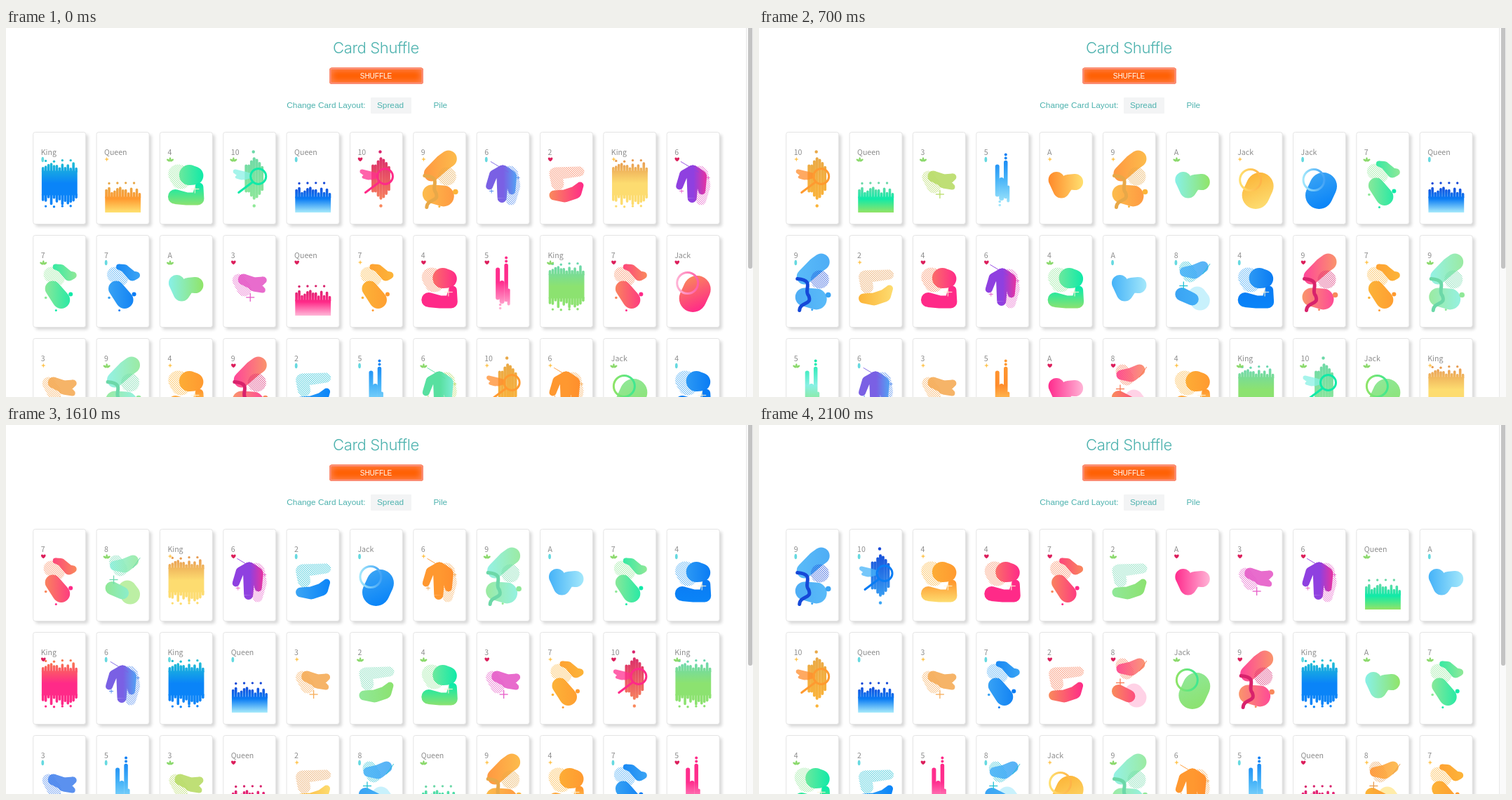
Animation, 1065 px wide and 526 px high, one loop 2170 ms. Source, as an HTML page with a canvas:

```html
<!DOCTYPE html>
<html lang="en">
<head>
<meta charset="utf-8">
<title>Card Shuffle</title>
<style>
  html, body { margin: 0; width: 100%; height: 100%; overflow: hidden; background: #fff; }
  canvas { display: block; }
</style>
</head>
<body>
<canvas id="stage" width="1065" height="526"></canvas>
<script>
const c = document.getElementById('stage').getContext('2d');
const LOOP = 2170, COLUMNS = 11;

// Suits: h heart, d drop, l leaf, s star. T is the ten.
const deals = [
  { from: 0, cards: 'Kd Qs 4l Tl Qd Th 9s 6d 2h Ks 6h 7l 7d Al 3h Qh 7s 4h 5h Kl 7h Jh 3s 9l 4s 9h 2d 5d 6l Ts 6s Jl 4d' },
  { from: 560, cards: 'Ts Ql 3l 5d As 9s Al Js Jd 7l Qd 9d 2s 4h 6h 4l Ad 8d 4d 9h 7s 9l 5l 6d 3s 5s Ah 8h 4s Kl Tl Jl Ks' },
  { from: 1330, cards: '7h 8l Ks 6h 2d Jd 6s 9l Ad 7l 4d Kh 6d Kd Qd 3s 2l 4l 3h 7s Th Kl 3d 5d 3l Qh 2s 8d Ql 9s 4s 7d 5h' },
  { from: 2100, cards: '9d Td 4s 4h 7h 2l Ah 3h 6h Ql Ad Ts Qd 3s 7d 2h 8h Jl 9h Kd Al 7l 4l 2d 5h 8d Js 9l 6s 5d Qh 8s 7s' }
];

const names = { T: '10', J: 'Jack', Q: 'Queen', K: 'King' };

const palettes = {
  h: { edge: '#f97850', base: '#ff2a88', deep: '#d8226c', main: '#ff2a88', start: '#ff2f8f', tip: '#ffb4d6', odd: '#e65cc8', warm: '#f9885c', horse: '#8f40e0' },
  d: { edge: '#20c0d4', base: '#0a84f8', deep: '#1548d8', main: '#0a7cf4', start: '#48b4f8', tip: '#a4e8fb', odd: '#4a86ee', warm: '#3aa4f4', horse: '#7a60e4' },
  l: { edge: '#6cd8b0', base: '#8ce270', deep: '#6cd8a8', main: '#10eaa8', start: '#88f0e4', tip: '#90e468', odd: '#b8dc68', warm: '#90e898', horse: '#58e0a0' },
  s: { edge: '#e89c50', base: '#fddc70', deep: '#e8a848', main: '#ff9a30', start: '#ff8c2c', tip: '#ffe070', odd: '#f6ac58', warm: '#fcb438', horse: '#ff9830' }
};

const rand = n => {
  const v = Math.sin(n * 12.9898 + 4.1) * 43758.5453;
  return v - Math.floor(v);
};

function ramp(colors, x0, y0, x1, y1) {
  const g = c.createLinearGradient(x0, y0, x1, y1);
  colors.forEach((k, i) => g.addColorStop(i / (colors.length - 1), k));
  return g;
}
const across = (...colors) => ramp(colors, 14, 0, 62, 0);
const down = (y0, y1, ...colors) => ramp(colors, 0, y0, 0, y1);

// Circles [x, y, r] joined one to the next by their outer tangents.
function chain(circles) {
  const path = new Path2D();
  circles.forEach(([x, y, r], i) => {
    path.moveTo(x + r, y);
    path.arc(x, y, r, 0, 2 * Math.PI);
    if (!i) return;
    const [px, py, pr] = circles[i - 1];
    const dir = Math.atan2(y - py, x - px);
    const ratio = (pr - r) / Math.hypot(x - px, y - py);
    const open = Math.acos(Math.max(-1, Math.min(1, ratio)));
    const a = dir - open, b = dir + open;
    path.moveTo(px + pr * Math.cos(a), py + pr * Math.sin(a));
    path.lineTo(x + r * Math.cos(a), y + r * Math.sin(a));
    path.lineTo(x + r * Math.cos(b), y + r * Math.sin(b));
    path.lineTo(px + pr * Math.cos(b), py + pr * Math.sin(b));
    path.closePath();
  });
  return path;
}

function blob(paint, ...circles) {
  c.fillStyle = paint;
  c.fill(chain(circles));
}

function faint(alpha, draw) {
  c.globalAlpha = alpha;
  draw();
  c.globalAlpha = 1;
}

function line(x0, y0, x1, y1, paint, width, cap = 'round') {
  c.beginPath();
  c.moveTo(x0, y0);
  c.lineTo(x1, y1);
  c.strokeStyle = paint;
  c.lineWidth = width;
  c.lineCap = cap;
  c.stroke();
}

function hatch(color, ...circles) {
  c.save();
  c.clip(chain(circles));
  for (let x = -70; x < 75; x += 2.9) line(x, 30, x + 80, 110, color, 0.9);
  c.restore();
}

const dot = (x, y, r, paint) => blob(paint, [x, y, r]);

function ring(x, y, r, paint) {
  c.beginPath();
  c.arc(x, y, r, 0, 2 * Math.PI);
  c.lineWidth = 3;
  c.strokeStyle = paint;
  c.stroke();
}

function plus(x, y, r, color, width = 1.3) {
  line(x - r, y, x + r, y, color, width, 'butt');
  line(x, y - r, x, y + r, color, width, 'butt');
}

// A row of thirteen drips reaching away from a solid edge, with loose drops.
function drips(edge, reach, paint, seed) {
  for (let i = 0; i < 13; i++) {
    const x = 14 + i * 3.95;
    const length = reach * (0.15 + 0.5 * rand(seed + i) + 0.25 * (i % 2));
    line(x, edge, x, edge + length, paint, 3.6);
    if (i % 3 === 1) dot(x, edge + reach * (0.95 + 0.2 * rand(seed - i)), 1.7, paint);
  }
}

const art = {
  A(p) {
    blob(across(p.start, p.tip), [24, 68, 11.5], [31, 82, 12], [40, 71, 10.5], [50.5, 71, 11.5]);
  },
  2(p) {
    hatch(p.edge, [56, 56, 7], [22, 59, 9], [25, 74, 9]);
    blob(across(p.warm, p.base), [20, 90, 7], [35, 91, 9], [50, 86, 9], [57, 76, 5]);
  },
  3(p) {
    hatch(p.odd, [22, 64, 9], [30, 77, 10]);
    faint(0.9, () => blob(p.odd, [29, 63, 8], [44, 69, 9], [57, 64, 5], [44, 71, 9], [56, 78, 4]));
    plus(38.5, 88.5, 6, p.odd);
  },
  4(p) {
    hatch(p.warm, [26, 60, 14], [30, 67, 14]);
    blob(across(p.warm, p.main), [42, 61, 14.5], [49, 62, 13]);
    blob(down(76, 104, p.main, p.base), [22, 92, 10.5], [38, 95, 9], [54, 95, 9], [56, 78, 6]);
    plus(50, 81, 6, 'rgba(255,245,215,.8)');
  },
  5(p) {
    const g = down(30, 104, p.main, p.start, p.tip);
    line(30, 49, 30, 89, g, 6);
    line(36, 68, 36, 94, g, 7);
    line(42, 43, 42, 92, g, 5.5);
    line(45.5, 78, 45.5, 98, g, 4);
    for (const y of [32, 37]) {
      dot(42, y, 2, g);
      dot(33.5, y + 67, 1.8, g);
    }
  },
  6(p) {
    const g = across(p.horse, p.horse, p.start);
    hatch(p.odd, [47, 60, 12], [51, 76, 11], [49, 97, 7]);
    blob(g, [18, 77, 5], [24, 60, 6], [37, 56, 9], [36, 94, 6.5]);
    blob(g, [37, 57, 10], [48, 63, 9], [50, 84, 5]);
    line(20, 42, 45, 57, p.horse, 0.9);
    plus(59, 65, 2.5, p.odd, 0.8);
    plus(21, 84, 3, p.odd, 0.9);
  },
  7(p) {
    hatch(p.warm, [26, 56, 11], [34, 61, 11]);
    blob(across(p.main, p.warm), [32, 45, 4], [40, 47, 5.5], [51, 58, 7], [57, 57, 5]);
    blob(across(p.warm, p.main), [28, 76, 11], [40, 92, 12.5]);
    dot(53.5, 84, 3, p.main);
    dot(32.6, 107, 1.5, p.main);
    dot(18, 89, 1.8, p.warm);
  },
  8(p) {
    hatch(p.edge, [28, 47, 10], [34, 57, 10]);
    faint(0.85, () => blob(across(p.start, p.warm), [26, 52, 7], [40, 52, 10], [52, 45, 8]));
    line(62, 41, 52, 55, p.edge, 1);
    faint(0.6, () => blob(p.tip, [44, 86, 13], [48, 93, 14]));
    blob(across(p.warm, p.start), [22, 84, 9.5], [37, 91, 9]);
    plus(24.5, 72, 6, p.edge);
  },
  9(p) {
    faint(0.9, () => {
      blob(across(p.start, p.warm), [50, 38, 12], [43, 43, 12], [26, 59, 11]);
      blob(across(p.warm, p.start), [26, 88, 13], [43, 91, 15]);
    });
    hatch(p.deep, [48, 63, 13]);
    c.beginPath();
    c.moveTo(16, 62);
    c.bezierCurveTo(42, 64, 24, 78, 32, 86);
    c.bezierCurveTo(38, 100, 20, 94, 19, 107);
    c.lineWidth = 5;
    c.lineCap = 'round';
    c.strokeStyle = p.deep;
    c.stroke();
    dot(60, 85, 3.8, p.warm);
    dot(37, 106, 1.5, p.warm);
  },
  T(p) {
    const g = down(28, 102, p.deep, p.warm);
    for (let i = -3; i <= 3; i++) {
      const half = 31 - Math.abs(i) * 4.5 - 5 * rand(i + 9);
      line(44 + i * 3.8, 65 - half, 44 + i * 3.8, 67 + half, g, 4);
    }
    dot(43, 28, 2.2, g);
    dot(44, 105, 2.2, g);
    faint(0.75, () => blob(p.start, [17, 56, 3], [30, 62, 6], [37, 62, 4], [26, 63, 5], [19, 64, 2]));
    ring(50, 63, 11, p.main);
    line(42, 71, 22, 86, p.main, 3);
  },
  J(p) {
    blob(ramp([p.warm, p.base], 28, 60, 48, 106), [43, 77, 19.5], [37, 90, 19.5]);
    ring(29.5, 68, 15, across(p.tip, p.main));
  },
  Q(p) {
    const g = down(76, 114, p.deep, p.main, p.tip);
    c.fillStyle = g;
    c.fillRect(12.2, 92, 50.8, 22.5);
    drips(93, -18, g, 3);
  },
  K(p) {
    const g = down(42, 104, p.edge, p.base, p.base);
    c.fillStyle = g;
    c.fillRect(12.2, 55, 50.8, 35);
    drips(56, -14, g, 5);
    drips(89, 16, g, 31);
  }
};

function ellipse(x, y, rx, ry) {
  c.beginPath();
  c.ellipse(x, y, rx, ry, 0, 0, 2 * Math.PI);
  c.fill();
}

const suits = {
  h() {
    c.fillStyle = '#dc1f5c';
    c.beginPath();
    c.moveTo(0, 3.2);
    c.bezierCurveTo(-6, -1, -2.5, -4.6, 0, -1.6);
    c.bezierCurveTo(2.5, -4.6, 6, -1, 0, 3.2);
    c.fill();
  },
  d() {
    c.fillStyle = '#66d9e0';
    ellipse(-1, 0.4, 1.9, 3.8);
  },
  l() {
    c.fillStyle = '#8bd96c';
    for (const turn of [-1, 0, 1]) {
      c.save();
      c.translate(0, 3);
      c.rotate(turn);
      ellipse(0, -3, 1.4, 2.9);
      c.restore();
    }
  },
  s() {
    c.fillStyle = '#ffc44d';
    c.beginPath();
    for (let i = 0; i < 8; i++) {
      const r = i % 2 ? 1.2 : 3.3, a = i * Math.PI / 4;
      c.lineTo(r * Math.sin(a), r * Math.cos(a));
    }
    c.fill();
  }
};

function text(s, x, y, font, color, align = 'left') {
  c.font = font;
  c.fillStyle = color;
  c.textAlign = align;
  c.fillText(s, x, y);
}

function box(x, y, w, h, r, fill) {
  c.beginPath();
  c.roundRect(x, y, w, h, r);
  c.fillStyle = fill;
  c.fill();
}

function drawCard([rank, suit], i) {
  c.save();
  c.translate(38.7 + (i % COLUMNS) * 90.35, 148.5 + Math.floor(i / COLUMNS) * 147);
  c.save();
  c.shadowColor = 'rgba(0,0,0,.16)';
  c.shadowBlur = 4;
  c.shadowOffsetX = c.shadowOffsetY = 3.5;
  box(0, 0, 75, 131, 3, '#fff');
  c.restore();
  c.strokeStyle = '#e4e4e4';
  c.lineWidth = 1;
  c.stroke();
  art[rank](palettes[suit]);
  text(names[rank] || rank, 11, 32.5, '300 10.6px "Noto Sans CJK SC", "Noto Sans CJK JP", "Open Sans", sans-serif', '#8c8c8c');
  c.translate(14.6, 38.6);
  suits[suit]();
  c.restore();
}

function drawButton() {
  c.save();
  box(461, 56.5, 134, 23.5, 4, '#ff5f00');
  c.clip();
  c.shadowColor = '#ff9c88';
  c.shadowBlur = 10;
  c.strokeStyle = '#fb8d74';
  c.lineWidth = 5;
  c.stroke();
  c.restore();
  text('SHUFFLE', 527.5, 72, '10px "Liberation Sans", Arial, sans-serif', '#fff', 'center');
}

function drawPage() {
  const teal = '#4db2ae', label = '11.8px "Liberation Sans", Arial, sans-serif';
  c.letterSpacing = '-0.4px';
  text('Card Shuffle', 527.5, 35.5, '300 22.1px Inter, Roboto, sans-serif', teal, 'center');
  c.letterSpacing = '0px';
  drawButton();

  box(520, 99, 58, 23, 1, '#f3f4f5');
  text('Change Card Layout:', 400.3, 114, label, teal);
  text('Spread', 529, 114, label, teal);
  text('Pile', 609.5, 114, label, teal);

  box(1055, 0, 10, 526, 0, '#fafafa');
  box(1055, 0, 1, 526, 0, '#e8e8e8');
  box(1058, -4, 6.2, 347, 3, '#c3c3c3');
}

let shown = null;
function frame(now) {
  const deal = deals.findLast(d => d.from <= now % LOOP);
  if (deal !== shown) {
    shown = deal;
    box(0, 0, 1065, 526, 0, '#fff');
    drawPage();
    deal.cards.split(' ').forEach(drawCard);
  }
  requestAnimationFrame(frame);
}
frame(0);
</script>
</body>
</html>
```
